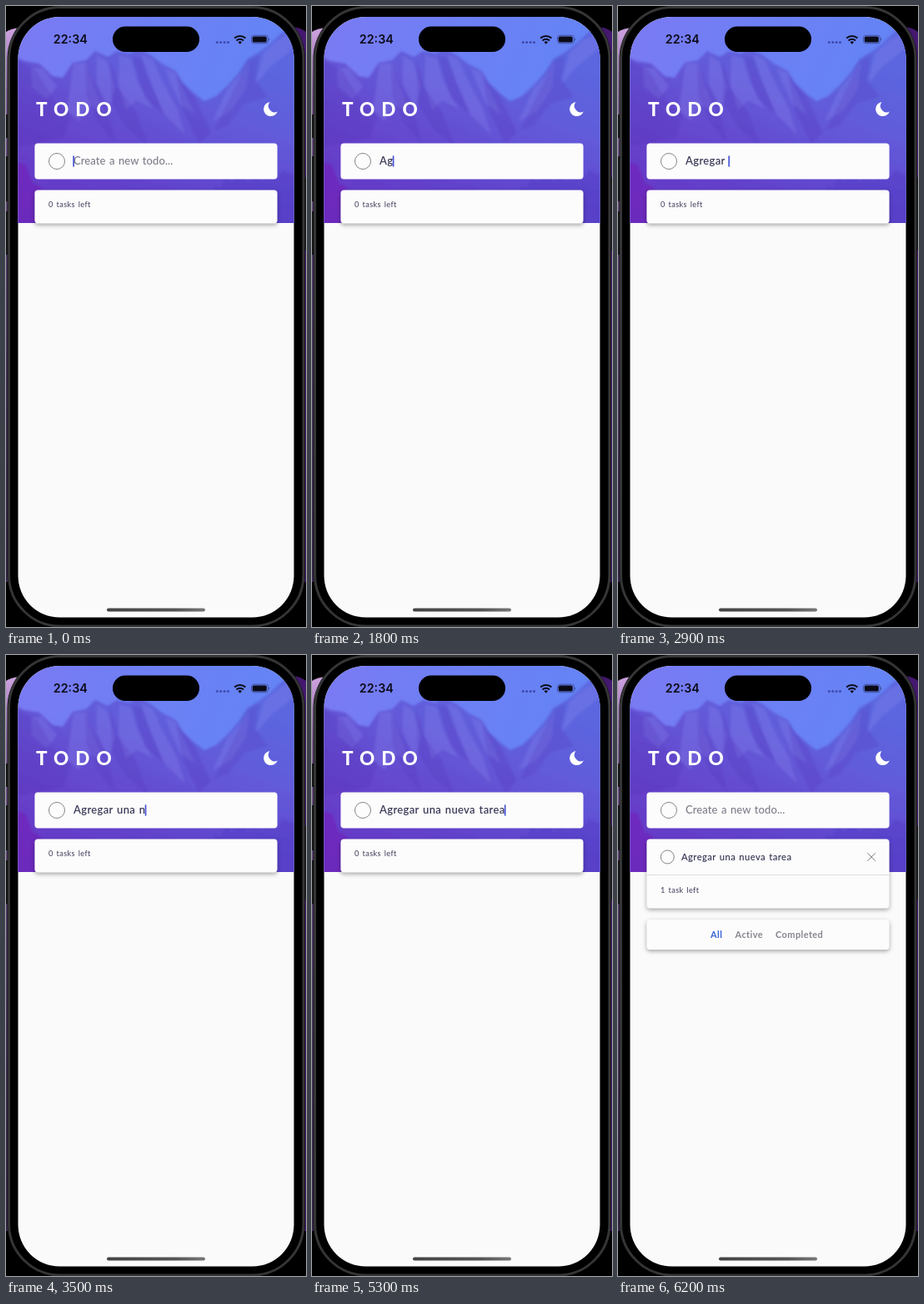
Recreate the animation shown at these times as an HTML page. Size 360 px wide and 744 px high, loop 8.4 s.

```html
<!DOCTYPE html>
<html lang="en">
<head>
<meta charset="utf-8">
<title>Todo</title>
<style>
html, body { margin: 0; width: 100%; height: 100%; overflow: hidden; background: #000; }
svg { display: block; width: 360px; height: 744px; }
text { font-family: Lato, "Open Sans", sans-serif; white-space: pre; fill: #3b3b59; }
.title { font-size: 22.5px; font-weight: 800; letter-spacing: 8px; fill: #fff; }
.clock { font: 600 14.3px Inter, sans-serif; fill: #0b0b18; }
.input { font-size: 13px; letter-spacing: .34px; word-spacing: 1px; font-weight: 600; }
.hint { fill: #7d7d8b; letter-spacing: .1px; font-weight: 500; }
.item { font-size: 11.2px; letter-spacing: .4px; word-spacing: 1px; font-weight: 600; }
.count { font-size: 9.2px; letter-spacing: .4px; word-spacing: 1px; }
.tab { font-size: 11px; font-weight: 700; letter-spacing: .4px; fill: #85858f; }
.card { fill: #fcfcfc; filter: drop-shadow(0 2px 2.5px #0005); }
.ring { fill: none; stroke: #85858c; stroke-width: 1; }
</style>
</head>
<body>
<svg viewBox="0 0 360 744">
  <defs>
    <linearGradient id="sky" x1="0" y1="0" x2="1" y2=".3">
      <stop offset="0" stop-color="#7b7af3"/>
      <stop offset=".5" stop-color="#6c80f4"/>
      <stop offset="1" stop-color="#6285f5"/>
    </linearGradient>
    <linearGradient id="rock" x1="0" y1="1" x2=".6" y2="0">
      <stop offset="0" stop-color="#7425bd"/>
      <stop offset=".35" stop-color="#663fc8"/>
      <stop offset=".7" stop-color="#6358d8"/>
      <stop offset="1" stop-color="#5b66df"/>
    </linearGradient>
    <linearGradient id="haze" x1="0" y1="0" x2="0" y2="1">
      <stop offset="0" stop-color="#5a4fd4" stop-opacity="0"/>
      <stop offset="1" stop-color="#5a3ac8" stop-opacity=".75"/>
    </linearGradient>
    <linearGradient id="side" x1="0" y1="0" x2="0" y2="1">
      <stop offset="0" stop-color="#cda2df"/>
      <stop offset=".12" stop-color="#8c67a6"/>
      <stop offset=".4" stop-color="#5a4275"/>
      <stop offset="1" stop-color="#38264f"/>
    </linearGradient>
    <linearGradient id="bar">
      <stop offset="0" stop-color="#444"/>
      <stop offset=".7" stop-color="#555"/>
      <stop offset="1" stop-color="#777"/>
    </linearGradient>
    <filter id="soft"><feGaussianBlur stdDeviation="1.4"/></filter>
    <clipPath id="screen"><rect x="14.5" y="13" width="331" height="719.6" rx="50"/></clipPath>
    <clipPath id="head"><rect x="14" y="13" width="332" height="247"/></clipPath>
  </defs>

  <!-- desktop and phone -->
  <rect width="360" height="744"/>
  <path d="M0 31Q6 27 16 26V690H0z" fill="url(#side)"/>
  <path d="M344 25Q354 26 360 31V690H344z" fill="#43186e"/>
  <path d="M0 130h4v28H0zM0 180h4v54H0zM0 246h4v52H0zM357 205h3v88h-3z" fill="#171719"/>
  <rect x="1.5" y="0" width="357.5" height="744" rx="63"/>
  <rect x="3.5" y="1.5" width="353.5" height="741.5" rx="61.5" fill="none" stroke="#353537" stroke-width="3"/>

  <g clip-path="url(#screen)">
    <rect x="14" y="13" width="332" height="720" fill="#fafafa"/>
    <g clip-path="url(#head)">
      <rect x="14" y="13" width="332" height="247" fill="url(#sky)"/>
      <g filter="url(#soft)">
        <path d="M5 58L22 66 40 69 56 84 68 86 80 68 96 65 107 54 122 61 133 54 148 57 158 51 174 59 187 69 204 78 212 92 226 105 238 114 252 108 266 95 279 80 290 63 304 55 316 46 332 31 355 26V275H5z" fill="url(#rock)"/>
        <g fill="#8b8cf0" opacity=".28">
          <path d="M81 70l15-2 8 25 15 35-20-9-12 19-14-13z"/>
          <path d="M109 59l12 7 10 30-7 28-15-31z"/>
          <path d="M136 59l14 4 8 28 18 32-20-10-12 12-9-30z"/>
          <path d="M162 58l14 6 9 21 20 38 10 31-25-24-16-38z"/>
          <path d="M191 75l12 5 10 20 14 30-17-11-13-28z"/>
          <path d="M266 99l15-16 11-17-4 33-18 27-22 12z"/>
          <path d="M309 56l18-16 18-9v20l-28 22-18 21z"/>
          <path d="M30 75l13-1 18 22-12 16-18-15z"/>
        </g>
        <g fill="#4f2db4" opacity=".2">
          <path d="M95 67l10 24 18 37 8 37-21-26-14-32z"/>
          <path d="M125 65l10 33 20 27 17 45-28-25-17-28z"/>
          <path d="M151 60l11 2 11 30 17 38-23-19z"/>
          <path d="M15 66l22 12 20 34 21 18-8 28-55 10z"/>
          <path d="M204 82l22 27 20 42-14 14-20-39z"/>
          <path d="M290 66l14-8-5 29 15 22-28 8-20 26-16 6z"/>
        </g>
        <path d="M5 165l30 6 32-13 38 10 40-16 42 20 43-17 34 12 38-12 53 13v102H5z" fill="url(#haze)"/>
        <path d="M250 215l8 2 6-14 7 9 10-13 9 13 9-12 8 11 9-15 8 13 8-12 23 8v68H250z" fill="#5540c9" opacity=".6"/>
        <path d="M5 185l19 5 8 22 9 4 9 54H5z" fill="#7321b7" opacity=".6"/>
      </g>
    </g>

    <!-- status bar -->
    <text class="clock" x="56.8" y="45.3">22:34</text>
    <rect x="128" y="24.5" width="104" height="30.5" rx="15.2"/>
    <g fill="#3f49ad">
      <circle cx="253.3" cy="43.5" r="1.5"/><circle cx="257.7" cy="43.5" r="1.5"/>
      <circle cx="262.1" cy="43.5" r="1.5"/><circle cx="266.5" cy="43.5" r="1.5"/>
    </g>
    <path d="M274.2 38.6a9.6 9.6 0 0 1 13.2 0M276.6 41.4a6.1 6.1 0 0 1 8.4 0" fill="none" stroke="#0b0b18" stroke-width="2.1"/>
    <path d="M280.8 45.8l-2.3-2.6a3.4 3.4 0 0 1 4.6 0z" fill="#0b0b18"/>
    <rect x="294.5" y="35.2" width="20" height="9.6" rx="3" fill="none" stroke="#23265a" stroke-opacity=".55"/>
    <rect x="295.8" y="36.4" width="17" height="7.2" rx="1.9" fill="#0b0b18"/>
    <path d="M315.7 38.4q1.6 1.6 0 3.2z" fill="#23265a"/>

    <text class="title" x="36" y="132">TODO</text>
    <path d="M316.5 115A8.6 8.6 0 1 0 325.8 126.5A7.6 7.6 0 0 1 316.5 115z" fill="#fff"/>

    <!-- new todo -->
    <rect x="34.4" y="164.6" width="291.2" height="42.9" rx="4" fill="#fcfcfc"/>
    <circle class="ring" cx="61" cy="186" r="9.5"/>
    <text class="input hint" id="hint" x="81" y="190">Create a new todo...</text>
    <text class="input" id="typed" x="81" y="190"></text>
    <rect id="caret" y="179.3" width="1.7" height="13.4" rx=".8" fill="#4655d6"/>

    <!-- empty list -->
    <g id="empty">
      <rect class="card" x="34.4" y="220.6" width="291.2" height="39.8" rx="4"/>
      <text class="count" x="51" y="241.3">0 tasks left</text>
    </g>

    <!-- list with one task -->
    <g id="list">
      <rect class="card" x="34.4" y="220.6" width="291.2" height="83" rx="4"/>
      <circle class="ring" cx="59.3" cy="242" r="8"/>
      <text class="item" x="76" y="245.5">Agregar una nueva tarea</text>
      <path d="M299.5 237.3l9.4 9.4m0-9.4l-9.4 9.4" stroke="#777780"/>
      <path d="M34.4 263.5h291.2" stroke="#dedee3"/>
      <text class="count" x="51" y="285">1 task left</text>
      <rect class="card" x="34.4" y="317" width="291.2" height="36" rx="4"/>
      <text class="tab" x="111" y="338.5" style="fill:#3a62da">All</text>
      <text class="tab" x="140.5" y="338.5">Active</text>
      <text class="tab" x="189" y="338.5">Completed</text>
    </g>

    <rect x="121" y="721.5" width="118" height="4" rx="2" fill="url(#bar)"/>
  </g>
</svg>
<script>
const LOOP = 8400, SUBMIT = 5700;
const phrase = 'Agregar una nueva tarea';
// moment each character is typed, in tenths of a second
const keys = [16, 18, 20, 21, 23, 25, 26, 28, 30, 31, 32, 33,
  35, 36, 38, 40, 41, 43, 44, 47, 49, 50, 53];
const [hint, typed, caret, empty, list] =
  ['hint', 'typed', 'caret', 'empty', 'list'].map(id => document.getElementById(id));
const show = (el, on) => el.style.display = on ? '' : 'none';
const clamp = v => Math.max(0, Math.min(1, v));

// idle blink: hold, fade out, stay off, fade in
function blink(t) {
  const p = t % 1000;
  return p < 650 ? 1 - clamp((p - 300) / 300) : clamp((p - 800) / 200);
}

function draw(t) {
  const done = t >= SUBMIT;
  const n = done ? 0 : keys.filter(k => k * 100 <= t).length;
  typed.textContent = phrase.slice(0, n);
  show(hint, !n);
  show(empty, !done);
  show(list, done);
  show(caret, !done);
  caret.setAttribute('x', 80.3 + (n ? typed.getComputedTextLength() : 0));
  caret.setAttribute('opacity', n ? 1 : blink(t));
}

function frame() {
  draw(performance.now() % LOOP);
  requestAnimationFrame(frame);
}
frame();
</script>
</body>
</html>
```
